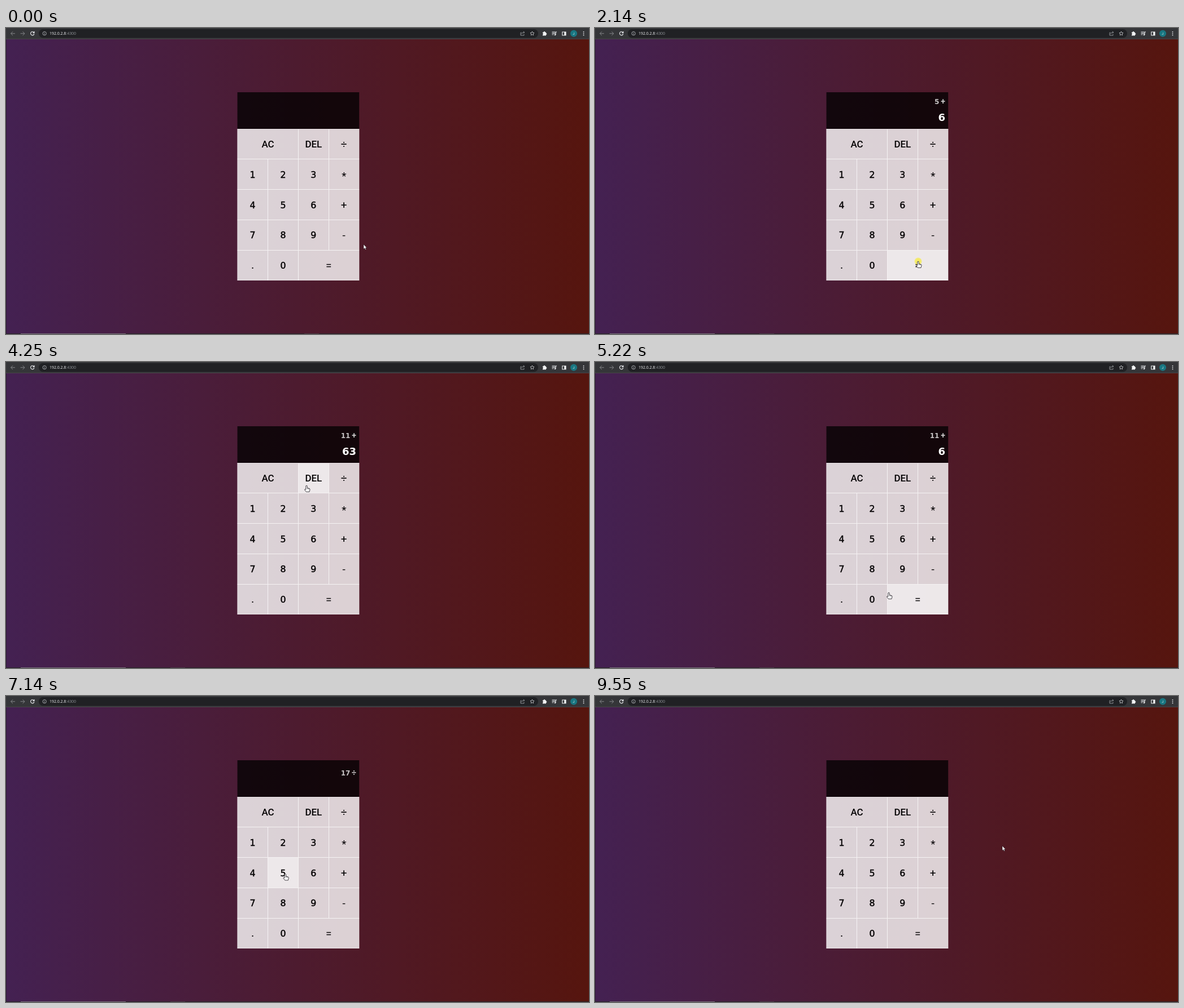
Write an HTML page with a canvas that moves like this. It is 1032 by 543 pixels and loops after 9.62 s.

```html
<!DOCTYPE html>
<html lang="en">
<head>
<meta charset="utf-8">
<title>Calculator</title>
<style>
  html, body { margin: 0; width: 100%; height: 100%; overflow: hidden; background: #4d1b2f; }
  canvas { display: block; width: 1032px; height: 543px; }
</style>
</head>
<body>
<canvas id="stage" width="1032" height="543"></canvas>
<script>
const ctx = document.getElementById('stage').getContext('2d');
const LOOP = 9620;
const DIGITS = '"DejaVu Sans", sans-serif';
const LETTERS = 'Roboto, sans-serif';

// Calculator geometry; a label listed twice in a row spans two columns
const LEFT = 409.6, TOP = 179, CELL_W = 53.9, CELL_H = 53.8;
const WIDTH = CELL_W * 4, HEIGHT = CELL_H * 5;
const LAYOUT = ['AC AC DEL ÷', '1 2 3 *', '4 5 6 +', '7 8 9 -', '. 0 = ='];
const colEdge = c => Math.floor(LEFT + CELL_W * c);
const rowEdge = r => Math.floor(TOP + CELL_H * r);

const KEYS = LAYOUT.flatMap((row, r) => {
  const labels = row.split(' ');
  return [...new Set(labels)].map(label => {
    const c = labels.indexOf(label), end = labels.lastIndexOf(label) + 1;
    const x = colEdge(c) + 1, y = rowEdge(r) + 1;
    return {
      label, x, y,
      w: colEdge(end) - x, h: rowEdge(r + 1) - y,
      cx: LEFT + CELL_W * (c + end) / 2,
      cy: TOP + CELL_H * (r + .5) + .3
    };
  });
});

// Presses: time and place; the pointer starts and ends outside the keypad
const START = { x: 633, y: 384 };
const EXIT = { t: 9660, x: 721, y: 266 };
const PRESSES = [
  [600, 494, 320], [1100, 597, 316], [1500, 546, 314], [2130, 572, 414],
  [2920, 599, 323], [3430, 546, 314], [3870, 538, 262], [4380, 532, 219],
  [5400, 520, 409], [6560, 592, 212], [7530, 494, 316], [8150, 555, 415],
  [9090, 465, 212]
].map(([t, x, y]) => ({ t, x, y, label: keyAt(x, y).label }));

const HOLD = 180;       // the glow lasts and the pointer rests this long
const SETTLE = 110;     // arrives at least this long before a press
const REACT = 60;       // delay of the display
const PACE = 3;         // ms per pixel of travel

const OPS = {
  '+': (a, b) => a + b, '-': (a, b) => a - b,
  '*': (a, b) => a * b, '÷': (a, b) => a / b
};
const HAND = new Path2D('M-1.2 .8Q0-.6 1.2 .8V4.4L5 5.5Q6.3 6 6 7.5L5 11.4H-.6L-3.5 7.7Q-3.7 5.9-1.2 7.3Z');
const ARROW = new Path2D('M0 0V8.2L1.9 6.5L3.2 9.3L4.5 8.7L3.3 6H5.6Z');

function rect(x, y, w, h, color) {
  ctx.fillStyle = color;
  ctx.fillRect(x, y, w, h);
}

function text(str, x, y, font, color, align = 'left') {
  ctx.font = font;
  ctx.textAlign = align;
  ctx.fillStyle = color;
  ctx.fillText(str, x, y);
}

function line(d, color, width = 1) {
  ctx.strokeStyle = color;
  ctx.lineWidth = width;
  ctx.stroke(new Path2D(d));
}

function disc(x, y, r, color) {
  ctx.fillStyle = color;
  ctx.beginPath();
  ctx.arc(x, y, r, 0, Math.PI * 2);
  ctx.fill();
}

function keyAt(x, y) {
  return KEYS.find(k => x >= k.x - 1 && x < k.x + k.w && y >= k.y - 1 && y < k.y + k.h);
}

function pointer(t) {
  let from = START, leave = 70;
  for (const to of [...PRESSES, EXIT]) {
    if (t < to.t) {
      const dist = Math.hypot(to.x - from.x, to.y - from.y);
      const travel = Math.min(dist * PACE, to.t - SETTLE - leave);
      const u = Math.min(1, Math.max(0, (t - leave) / travel));
      const k = 1 - (1 - u) ** 2;
      return { x: from.x + (to.x - from.x) * k, y: from.y + (to.y - from.y) * k };
    }
    from = to;
    leave = to.t + HOLD;
  }
  return from;
}

function press(state, label) {
  const { stored, op, entry } = state;
  if (label === 'AC') return { stored: '', op: '', entry: '' };
  if (label === 'DEL') return { stored, op, entry: entry.slice(0, -1) };
  if (label === '=') return { stored: '', op: '', entry: String(OPS[op](+stored, +entry)) };
  if (OPS[label]) return { stored: entry, op: label, entry: '' };
  return { stored, op, entry: entry + label };
}

function display(t) {
  return PRESSES.filter(p => t >= p.t + REACT)
    .reduce((s, p) => press(s, p.label), { stored: '', op: '', entry: '' });
}

function toolbar() {
  rect(0, 0, 1032, 20, '#353639');
  rect(0, 19, 1032, 1, '#494549');
  ctx.fillStyle = '#202124';
  ctx.beginPath();
  ctx.roundRect(58, 2, 884, 15.5, 7.7);
  ctx.fill();

  line('M16 9.8H8.6M12 6.4L8.6 9.8L12 13.2', '#85878a');
  line('M25.6 9.8H33M29.6 6.4L33 9.8L29.6 13.2', '#85878a');
  line('M49.4 7.8A3.2 3.2 0 1 0 49.9 10.5M50 6V8.7H47.3', '#e8eaed', 1.2);
  line('M71.4 9.7A3.2 3.2 0 1 1 65 9.7A3.2 3.2 0 1 1 71.4 9.7M68.2 9.2V11.7M68.2 7.5V8.3', '#bdc1c6', .8);

  const host = '192.0.2.8';
  const font = '6.95px "Open Sans", "Noto Sans", sans-serif';
  text(host, 77, 12.3, font, '#f1f2f4');
  text(':4300', 77 + ctx.measureText(host).width, 12.3, font, '#92969b');

  line('M912.5 8.2H911V13H917V11M912.8 10.6Q913 7.9 917.5 7.8M915.8 6L917.8 7.8L915.8 9.6', '#aeb1b5', .8);
  star(931.5, 9.8, 3.7);

  rect(950, 7.5, 6, 6, '#f1f3f4');
  disc(953, 7.2, 1.2, '#f1f3f4');
  disc(956, 10.5, 1.3, '#f1f3f4');
  disc(950, 10.6, 1, '#353639');
  line('M966.5 7H972.5M966.5 9.4H972.5M966.5 11.8H969.5M973 7V12M973 7H975', '#e8eaed', 1.1);
  disc(972, 12, 1.3, '#e8eaed');
  line('M984.8 7H991V13H984.8Z', '#f1f3f4', 1.1);
  rect(988.2, 7, 2.8, 6, '#f1f3f4');
  disc(1005, 9.8, 6, '#197782');
  text('J', 1005, 12, '6px ' + LETTERS, '#dcecee', 'center');
  for (let i = -1; i <= 1; i++) disc(1022.5, 9.8 + i * 2.9, .9, '#e8eaed');
}

function star(x, y, r) {
  ctx.beginPath();
  for (let i = 0; i < 10; i++) {
    const a = Math.PI * (i / 5 - .5), d = i % 2 ? r * .5 : r;
    ctx.lineTo(x + d * Math.cos(a), y + d * Math.sin(a));
  }
  ctx.closePath();
  ctx.strokeStyle = '#d5d7da';
  ctx.lineWidth = .8;
  ctx.stroke();
}

function page(t) {
  const g = ctx.createLinearGradient(0, 0, 1032, 0);
  g.addColorStop(0, 'rgb(68,33,82)');
  g.addColorStop(.5, 'rgb(77,27,47)');
  g.addColorStop(1, 'rgb(86,21,14)');
  rect(0, 20, 1032, 523, g);
  rect(0, 20, 1, 523, '#2b1a33');
  rect(0, 542, 1032, 1, '#262127');
  rect(26, 542, 186, 1, '#747076');
  rect(t < 500 ? 528 : 291, 542, 26, 1, '#403a40');
}

function screen(t) {
  rect(LEFT, 114, WIDTH, 65, 'rgba(0,0,0,.76)');
  const { stored, op, entry } = display(t);
  if (stored) {
    const y = entry ? 135 : 141;
    const grey = 'rgba(255,255,255,.76)';
    text(stored, 609.4, y, 'bold 12px ' + DIGITS, grey, 'right');
    text(op, 620, y, 'bold 14px ' + LETTERS, grey, 'right');
  }
  if (entry) text(entry, 620, stored ? 164.5 : 160.5, 'bold 18px ' + DIGITS, '#fff', 'right');
}

function keypad(active) {
  const edge = 'rgba(255,255,255,.72)', thin = .54;
  rect(LEFT, TOP, WIDTH, HEIGHT, 'rgba(255,255,255,.8)');
  rect(LEFT, TOP, WIDTH, thin, edge);
  rect(LEFT, TOP + HEIGHT - thin, WIDTH, thin, edge);
  rect(LEFT, TOP, thin, HEIGHT, edge);
  rect(LEFT + WIDTH - thin, TOP, thin, HEIGHT, edge);

  for (let r = 1; r < 5; r++) rect(LEFT, rowEdge(r), WIDTH, 1, edge);
  for (const k of KEYS) {
    if (k.x > LEFT + 1) rect(k.x - 1, k.y, 1, k.h, edge);
    if (k === active) rect(k.x, k.y, k.w, k.h, 'rgba(255,255,255,.5)');
    keyLabel(k);
  }
}

function keyLabel({ label, cx, cy }) {
  const ink = '#050304';
  if (/\d/.test(label)) {
    text(label, cx, cy + 5.7, '15.8px ' + DIGITS, ink, 'center');
    ctx.strokeStyle = ink;
    ctx.lineWidth = .45;
    ctx.strokeText(label, cx, cy + 5.7);
  } else if (/[A-Z.]/.test(label)) {
    text(label, cx, cy + 6, '500 17px ' + LETTERS, ink, 'center');
  } else {
    text(label, cx, cy + (label === '*' ? 8.5 : 6.5), '19px ' + LETTERS, ink, 'center');
  }
}

function cursor(t) {
  const { x, y } = pointer(t);
  if (PRESSES.some(p => t >= p.t && t < p.t + HOLD)) {
    const glow = ctx.createRadialGradient(x, y, 3, x, y, 7);
    glow.addColorStop(0, 'rgba(246,235,64,.8)');
    glow.addColorStop(.7, 'rgba(246,235,64,.65)');
    glow.addColorStop(1, 'rgba(246,235,64,0)');
    disc(x, y, 7, glow);
  }
  const hand = keyAt(x, y);
  const shape = hand ? HAND : ARROW;
  ctx.save();
  ctx.translate(x, y);
  ctx.lineJoin = 'round';
  ctx.fillStyle = '#fff';
  ctx.fill(shape);
  ctx.strokeStyle = '#17121a';
  ctx.lineWidth = hand ? .8 : .5;
  ctx.stroke(shape);
  if (hand) line('M1.2 4.4V6.5M2.9 5V6.8M4.5 5.4V7', '#17121a', .5);
  ctx.restore();
}

function draw(t) {
  const late = pointer(t - 70); // highlight trails the pointer slightly
  page(t);
  toolbar();
  screen(t);
  keypad(keyAt(late.x, late.y));
  cursor(t);
}

const start = performance.now();
function tick() {
  draw((performance.now() - start) % LOOP);
  requestAnimationFrame(tick);
}
tick();
</script>
</body>
</html>
```
